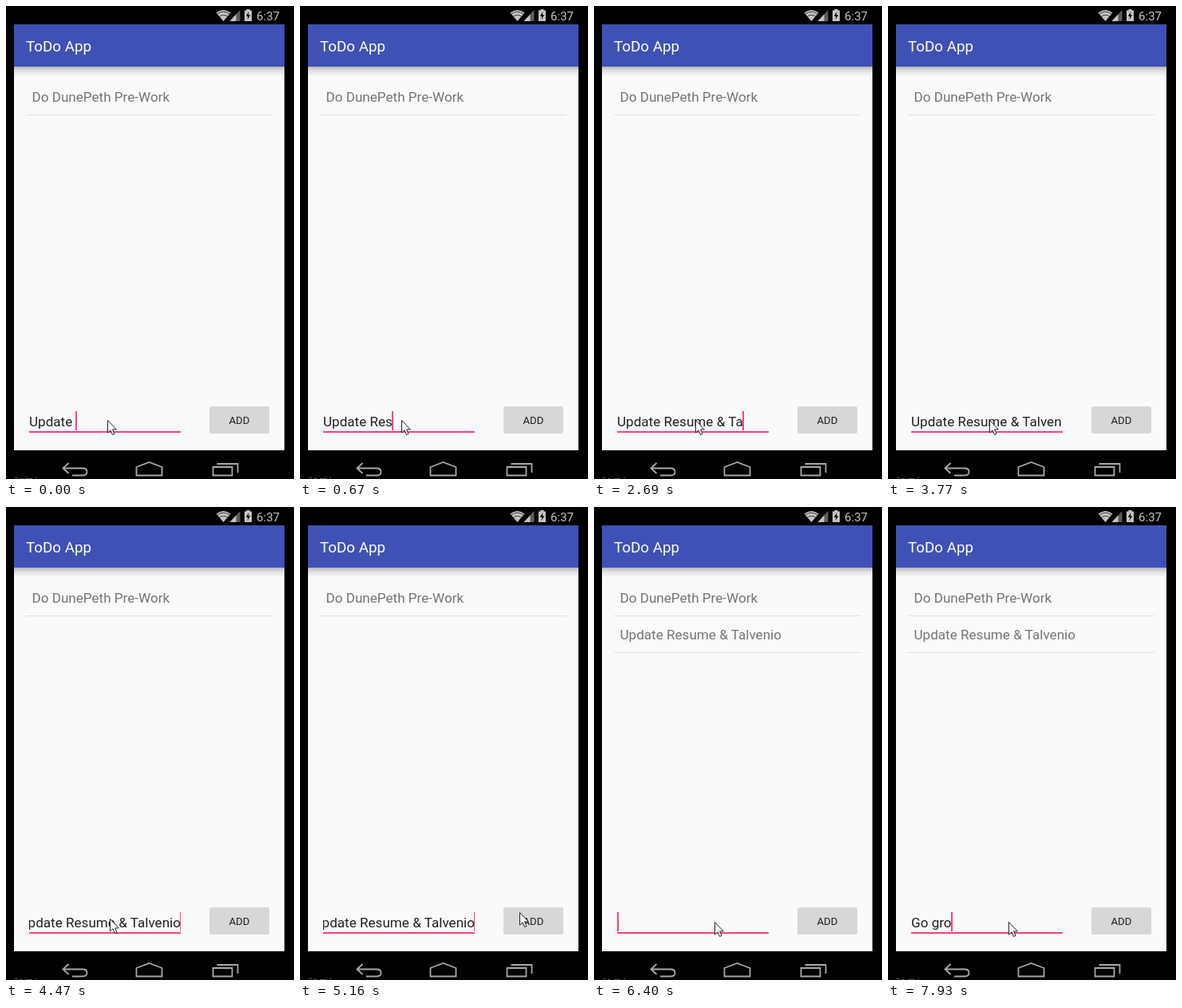
Write an HTML page that moves like this. It is 361 px wide and 593 px high and loops after 8000 ms.

```html
<!DOCTYPE html>
<html lang="en">
<head>
<meta charset="utf-8">
<title>ToDo App</title>
<style>
  html, body { margin: 0; height: 100%; overflow: hidden; background: #000; }
  svg { display: block; }
  text { font-family: Roboto, sans-serif; white-space: pre; }
  .item { font-size: 17.1px; fill: #757575; }
  .icon { fill: none; stroke: #a8a8a8; stroke-width: 1.8; }
</style>
</head>
<body>
<svg width="361" height="593" viewBox="0 0 361 593">
  <defs>
    <linearGradient id="shade" x2="0" y2="1">
      <stop offset="0" stop-opacity=".26"/>
      <stop offset=".45" stop-opacity=".1"/>
      <stop offset="1" stop-opacity="0"/>
    </linearGradient>
    <clipPath id="field"><rect x="29" y="500" width="190" height="36"/></clipPath>
  </defs>
  <rect width="361" height="593"/>
  <rect x="10" y="24" width="339" height="533" fill="#fafafa"/>
  <rect x="10" y="76" width="339" height="12" fill="url(#shade)"/>
  <rect x="10" y="23" width="339" height="53" fill="#3f51b5"/>
  <text x="25" y="57" font-size="18.8" fill="#fff">ToDo App</text>

  <!-- status bar -->
  <path d="M263.5 8.5Q272.5 1.5 281.5 8.5L272.5 19Z" fill="#c4c4c4"/>
  <path d="M265 10Q272.5 4.5 280 10M267.5 13Q272.5 9.5 277.5 13" fill="none" stroke="#000" stroke-width=".7"/>
  <path d="M293.5 5V19H280.5Z" fill="#5c5c5c"/>
  <path d="M288.5 10.4V19H280.5Z" fill="#c4c4c4"/>
  <path d="M299 5.5H301.5V4H305.5V5.5H308V19H299Z" fill="#c4c4c4"/>
  <path d="M304.5 7L300.8 12.7H303.3L302.6 17L306.3 11.2H303.8Z"/>
  <text x="314" y="17.5" font-size="15.1" fill="#c4c4c4">6:37</text>

  <!-- list -->
  <text class="item" x="32.5" y="120">Do DunePeth Pre-Work</text>
  <rect x="25" y="136" width="309" height="1" fill="#e0e0e0"/>
  <g id="added">
    <text class="item" x="32.5" y="166">Update Resume &amp; Talvenio</text>
    <rect x="25" y="182" width="309" height="1" fill="#e0e0e0"/>
  </g>

  <!-- input row -->
  <rect x="29" y="533" width="190" height="2" fill="#ff4081"/>
  <g clip-path="url(#field)">
    <text id="entry" y="527" font-size="17.1" fill="#212121"></text>
    <rect id="caret" y="508" width="2" height="24" fill="#ff4081"/>
  </g>
  <rect id="button" x="255" y="502" width="75" height="34" rx="2"/>
  <text x="292.5" y="524" font-size="13.3" text-anchor="middle" fill="#212121">ADD</text>

  <!-- navigation bar -->
  <path class="icon" d="M78.5 573L71.5 579.5L78.5 586M71.5 579.5H96Q101.500 579.5 101.500 584Q101.500 588.5 96 588.5H83"/>
  <path class="icon" d="M163.5 588.5V578L179.5 572L195.5 578V588.5Z"/>
  <path class="icon" d="M259.5 578H283.5V588.5H259.5ZM264.5 574H290.5V585"/>
  <path d="M11 591.5H15M17 592.5H21M25 592.5H33M37 591.5H39" stroke="#555"/>

  <path id="mouse" d="M.5.5V16L4 12.8L6.500 18.5L9 17.4L6.600 11.9H11.3Z" fill="#fff" stroke="#222"/>
</svg>
<script>
const LOOP = 8000, KEY = 135, BLINK = 530, PRESSED = 5340, ADDED = 5580;
const LEFT = 29, WIDTH = 190;
const [added, entry, caret, button, mouse] =
  ["added", "entry", "caret", "button", "mouse"].map(id => document.getElementById(id));

// Bursts of typing; a space comes with the letter before it.
const bursts = [
  [-955, "Update "], [380, "Resu"], [1060, "me "], [1460, "&"], [2110, " "],
  [2410, "T"], [2690, "alven"], [3905, "io"], [7240, "G"], [7510, "o gro"]
];
const keys = bursts.flatMap(([start, word]) =>
  word.match(/\S\s*|\s/g).map((text, i) => ({ text, time: start + i * KEY })));

// Eased pointer moves along quadratic curves.
const rest = [126.5, 519], onButton = [274.5, 508], onField = [151, 520];
const moves = [
  { from: 4400, to: 5160, curve: [rest, [200, 460], onButton] },
  { from: 5380, to: 6000, curve: [onButton, [213, 522], onField] }
];

function pointer(t) {
  const { from, to, curve: [a, b, c] } = moves.findLast(m => t >= m.from) ?? moves[0];
  const p = Math.min(1, Math.max(0, (t - from) / (to - from)));
  const s = p * p * (3 - 2 * p), r = 1 - s;
  return a.map((v, i) => r * r * v + 2 * r * s * b[i] + s * s * c[i]);
}

// The caret restarts its blinking at each key and at the press.
function caretOn(t) {
  const times = [...keys.map(key => key.time), PRESSED].filter(time => time <= t);
  return Math.floor((t - Math.max(...times)) / BLINK) % 2 === 0;
}

function draw(t) {
  const done = t >= ADDED;
  entry.textContent = keys
    .filter(({ time }) => time <= t && time >= ADDED === done)
    .map(key => key.text).join("");
  const width = entry.textContent ? entry.getComputedTextLength() : 0;
  const scroll = Math.max(0, width - WIDTH);
  entry.setAttribute("x", LEFT - scroll);
  caret.setAttribute("x", Math.max(LEFT, Math.floor(LEFT - .1 + width - scroll)));
  caret.setAttribute("opacity", Number(caretOn(t)));
  added.setAttribute("visibility", done ? "visible" : "hidden");
  button.setAttribute("fill", t >= PRESSED && !done ? "#c8c9c9" : "#d6d7d7");
  mouse.setAttribute("transform", `translate(${pointer(t).map(Math.round)})`);
}

const start = performance.now();
function tick() {
  draw((performance.now() - start) % LOOP);
  requestAnimationFrame(tick);
}
tick();
</script>
</body>
</html>
```
